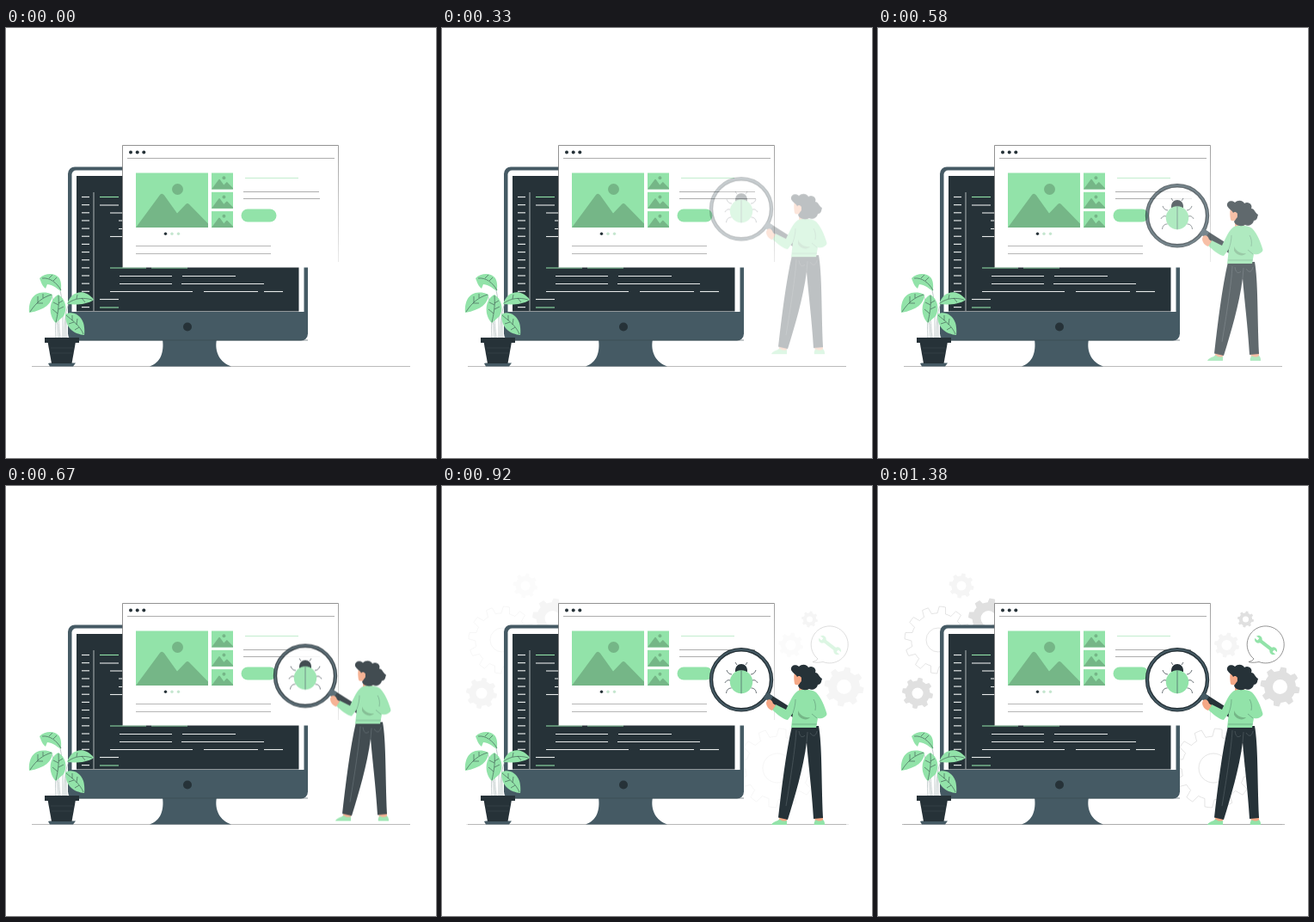
An HTML page with a canvas for the animation above (1.54 s loop, 500 by 500 pixels).

```html
<!DOCTYPE html>
<html lang="en">
<head>
<meta charset="utf-8">
<title>Bug search</title>
<style>
  html, body { margin: 0; width: 100%; height: 100%; overflow: hidden; background: #fff; }
  canvas { display: block; width: 500px; height: 500px; }
</style>
</head>
<body>
<canvas id="stage" width="500" height="500"></canvas>
<script>
const SIZE = 500, LOOP = 1540, FPS = 24;
const GREEN = '#92e3a9', SHADE = '#75b687', DARK = '#263238', SLATE = '#455a64';
const GREY = '#e0e0e0', PALE = '#f5f5f5', SKIN = '#f5a886';
const stage = document.getElementById('stage').getContext('2d');
let ctx;

function layer(draw) {
  const canvas = document.createElement('canvas');
  canvas.width = canvas.height = SIZE;
  ctx = canvas.getContext('2d');
  draw();
  return canvas;
}

function shape(path, fill, stroke, width = 0.6) {
  const p = typeof path === 'string' ? new Path2D(path) : path;
  if (fill) { ctx.fillStyle = fill; ctx.fill(p); }
  if (stroke) { ctx.strokeStyle = stroke; ctx.lineWidth = width; ctx.stroke(p); }
}

function ellipse(x, y, rx, ry, fill, stroke, width) {
  const p = new Path2D();
  p.ellipse(x, y, rx, ry, 0, 0, Math.PI * 2);
  shape(p, fill, stroke, width);
}

const circle = (x, y, r, ...paint) => ellipse(x, y, r, r, ...paint);

function box(x, y, w, h, fill, radius = 0) {
  const p = new Path2D();
  p.roundRect(x, y, w, h, radius);
  shape(p, fill);
}

const line = (x1, y, x2, color, width = 0.8) => shape(`M${x1} ${y}H${x2}`, null, color, width);

function gear(x, y, r, teeth, hole, fill, stroke) {
  const p = new Path2D();
  const pitch = Math.PI * 2 / teeth;
  for (let i = 0; i < teeth; i++) {
    const a = (i - 0.25) * pitch;
    p.arc(x, y, r * 0.8, a - pitch * 0.22, a + pitch * 0.19);
    p.arc(x, y, r, a + pitch * 0.31, a + pitch * 0.67);
  }
  p.closePath();
  shape(p, fill, stroke, 0.6);
  circle(x, y, hole, '#fff', stroke, 0.6);
}

function drawGears() {
  line(28, 393.5, 473, '#aaa');
  gear(70, 179, 39, 12, 14, '#fff', '#d2d2d2');
  gear(390, 328, 46, 12, 17, '#fff', '#d2d2d2');
  gear(97, 116, 14.5, 8, 5.5, PALE);
  gear(128.5, 154, 23.5, 8, 9, GREY);
  gear(46, 241, 18, 8, 6.5, GREY);
  gear(427.5, 155, 9.5, 8, 3.5, GREY);
  gear(405.5, 185, 14.5, 8, 6, PALE);
  gear(467.5, 233.5, 23, 8, 8.5, GREY);

  shape('M437 201 C436 203 433 204 431 204.5 C435 206 440 205 443 204.5 A21.5 21.5 0 1 0 437 201Z', '#fff', '#666', 0.7);
  ctx.save();
  ctx.translate(451, 185);
  ctx.rotate(0.66);
  box(-10, -2, 20, 4, GREEN);
  for (const side of [-1, 1]) {
    circle(side * 11, 0, 4.4, GREEN);
    box(side * 14 - 3, -1.6, 6, 3.2, '#fff');
  }
  ctx.restore();
}

function drawMonitor() {
  line(30, 393.5, 470, '#aaa');
  shape('M182 362 C184 377 180 389 167 393.5 H262 C249 389 242 377 245 362Z', SLATE);
  box(72, 161.5, 279, 202, SLATE, 8);
  box(76.5, 165.5, 270, 164.5, '#fff', [5, 5, 0, 0]);
  box(82, 172, 258.5, 157.5, DARK);
  line(72, 363, 351, '#37474f', 0.6);
  circle(211, 347.5, 5, DARK);

  for (let i = 0; i < 15; i++) line(88, 196.5 + i * 9.15, 97, '#e4e8e8', 1.2);
  shape('M102 191V329', null, '#aeb5b7', 1);
  const code = [
    [196.5, 109, 131, GREEN], [206, 109, 131], [215, 121, 136], [224, 131, 136],
    [233.5, 131, 136], [242.5, 121, 136], [279, 121, 163, GREEN], [279, 169, 211, GREEN],
    [288.5, 132, 193], [288.5, 205, 267], [297.5, 132, 193], [297.5, 204, 300],
    [306.5, 121, 217], [306.5, 230, 293], [306.5, 300, 322], [315.5, 109, 131],
    [325, 109, 131, GREEN]
  ];
  for (const [y, from, to, color = '#e8ebeb'] of code) line(from, y, to, color, 1.1);
}

function picture(x, y, w, h) {
  ctx.save();
  ctx.translate(x, y);
  ctx.scale(w / 84, h / 63.5);
  box(0, 0, 84, 63.5, GREEN);
  circle(48.5, 19, 6.5, SHADE);
  shape('M0 63.5 L28 25.5 Q30.5 23 33 26 L48 47 L58 36.5 Q60 34.5 62 36.5 L84 59 V63.5Z', SHADE);
  ctx.restore();
}

function drawBrowser() {
  box(135.5, 136.5, 251, 142, '#fff');
  shape('M135.5 278V136.5H386.5', null, '#777', 0.8);
  const fade = ctx.createLinearGradient(0, 137, 0, 276);
  fade.addColorStop(0, '#888');
  fade.addColorStop(1, '#e8e8e8');
  shape('M386.5 136.5V272', null, fade, 0.8);
  for (const x of [145, 152.7, 160.3]) circle(x, 144.5, 2, DARK);
  line(141, 151.5, 382, '#999');

  picture(151, 168.5, 84, 63.5);
  for (let i = 0; i < 3; i++) picture(239, 168.5 + i * 22.3, 25, 19);
  circle(185.5, 239.3, 1.7, DARK);
  circle(193, 239.3, 1.7, '#c5e6cf');
  circle(200.5, 239.3, 1.7, '#c5e6cf');

  line(151, 253.5, 308, '#a4a4a4');
  line(151, 262.5, 308, '#a4a4a4');
  line(278, 174.5, 340, '#b4e7c2');
  line(276, 190.5, 364, '#999');
  line(276, 198.5, 365, '#999');
  box(273.5, 210.5, 41, 15, GREEN, 7.5);
}

function drawPlant() {
  shape('M58 361 C58 352 57 345 58 340 M63 361 C62 350 61 342 61 336 M66 361 C66 340 67 322 63 305'
    + ' M68 361 C68 350 68 330 73 321 M70 361 L70 336 M61 361 C60 340 56 320 53 310', null, '#9aa', 0.6);
  const leaves = [
    'M39 291 C45 285 57 284 62 291 C65 296 64 302 64 306 C59 303 56 299 48 298 L46 303 C42 300 41 296 39 291Z',
    'M27 331 C26 318 31 308 43 307.5 C49 307 54 310 54 310 C54 320 45 328 27 331Z',
    'M61 310 C69 315 72 326 67 335 L58 343 C49 335 49 316 61 310Z',
    'M71 321 C74 311 82 306 90 307.5 C96 309 100 313 102 316 C94 322 80 322 71 321Z',
    'M69 333 C76 329 86 332 90 343 C92 350 91 357 91 357 C80 356 69 350 69 333Z'
  ];
  for (const leaf of leaves) shape(leaf, GREEN);
  shape('M42 291 C51 290 59 296 64 305 M50 291 L54 287 M55 294 L59 290'
    + ' M28 330 C35 319 43 313 53 310 M37 319 V312 M36 320 H43 M43 314 V309'
    + ' M61 311 C62 324 60 333 58 342 M61 320 L66 317 M61 327 L67 324 M61 322 L55 319 M60 332 L54 327'
    + ' M72 320 C80 314 90 313 100 316 M82 315 L83 310 M88 314 L92 319'
    + ' M70 334 C77 340 86 346 90 356 M77 340 V334 M82 345 L83 338 M79 342 L73 344 M85 348 L80 351', null, DARK, 0.5);
  shape('M51 389.5 H81 L78 393.5 H51 L49 390Z', SLATE);
  shape('M48.5 365 H81 L76.5 390 H53Z', DARK);
  box(45, 360, 40, 6, DARK);
  shape('M52 372 H78 M53 378 H77', null, '#3a4950', 0.6);
}

function drawMagnifier() {
  circle(348, 225.3, 35, '#fff', DARK, 4.4);
  circle(348, 225.3, 35.2, null, SLATE, 2);
  shape('M378 240 L411 261 L408 269 L374 246Z', DARK);
  shape('M378 240 L385 244.5 L381 251 L374 246Z', SLATE);

  shape('M341 216 C340 204 356 204 355 216Z', DARK);
  ellipse(348, 227.8, 13.2, 13.5, GREEN);
  shape('M348 214.5V241.3', null, SLATE, 0.7);
  for (const side of [-1, 1]) {
    ctx.save();
    ctx.translate(348, 0);
    ctx.scale(side, 1);
    shape('M5 208 L7 205 M11 219 C14 219 16 217 17 214 M13 226 C16 225 18 227 19 229'
      + ' M11.5 235 C15 235 17 237 17.5 241', null, DARK, 0.7);
    ctx.restore();
  }
}

function drawWoman() {
  shape('M393 384 L402 386 L400 391 L391 390Z M433 384 H443 L443 391 H434Z', SKIN);
  shape('M383 394 C384 391 389 390 393 387.5 C395 390 399 390 401 389 L401 394Z', GREEN);
  shape('M433 394 C432 391 434 389 435 388 C437 390 441 390 443 388 C445 390 445 392 445 394Z', GREEN);
  shape('M407 279 H438 C442 301 441 339 443 386 L432 387 C430 353 426 324 424 298 C420 329 410 362 402 388'
    + ' L391 385.5 C395 351 400 309 407 279Z', DARK);
  shape('M412 284 C411 304 405 342 400 372 M424 298 L425 286 M415 285 C416 292 419 293 422 290'
    + ' M428 287 C432 293 435 290 436 285', null, '#59656a', 0.6);

  shape('M410 217 C409 221 409 224 410 230 C411 232 414 231 415 231 L415 239 L426 239 L423 217Z', SKIN);
  shape('M414 238 C420 236 430 236 435 240 C441 246 445 256 447.5 265 C447 269 441 271 437 270'
    + ' L435 281 H406 L408 264 L402 272 C396 271 389 265 384 260 L388 254 L400 260 C405 250 408 242 414 238Z', GREEN);
  shape('M414 261 C416 266 421 270 428 269 C425 273 417 272 414 266Z', SHADE);
  shape('M408 264 C410 258 411 253 411 248 M436 270 L430 265 M434 261 C435 256 434 251 432 248'
    + ' M407 277 H436 M388 254 L384 260', null, '#52806b', 0.5);
  shape('M378 249 C381 247 384 249 385 253 L388 255 L384 261 C380 260 377 256 377 252Z', SKIN);

  shape('M406 214 C405 208 412 207 415 210 C419 206 425 208 426 211 C431 208 436 213 434 217'
    + ' C438 217 438 222 442 224 C441 227 441 231 437 231 C436 236 430 238 427 236'
    + ' C421 239 415 236 414 232 C416 230 418 227 418 223 C416 220 414 221 413 222 C412 219 408 218 406 214Z', DARK);
  ellipse(416.2, 226, 1.7, 2.3, SKIN);
}

const gears = layer(drawGears);
const scene = layer(() => { drawMonitor(); drawBrowser(); drawPlant(); });
const woman = layer(() => { drawMagnifier(); drawWoman(); });

const progress = (tick, from, length) => Math.min(1, Math.max(0, (tick - from) / length));

function place(image, alpha, y = 0) {
  stage.globalAlpha = alpha;
  stage.drawImage(image, 0, y);
}

function render(now) {
  // Motion advances in steps of 1/24 s.
  const tick = Math.floor((now % LOOP + 5) * FPS / 1000);
  stage.globalAlpha = 1;
  stage.fillStyle = '#fff';
  stage.fillRect(0, 0, SIZE, SIZE);
  place(gears, progress(tick, 17, 16));
  place(scene, 1);
  place(woman, progress(tick, 3.8, 14), -20 * (1 - progress(tick, 4, 15.5)));
}

const start = performance.now();
function loop() {
  render(performance.now() - start);
  requestAnimationFrame(loop);
}
loop();
</script>
</body>
</html>
```
